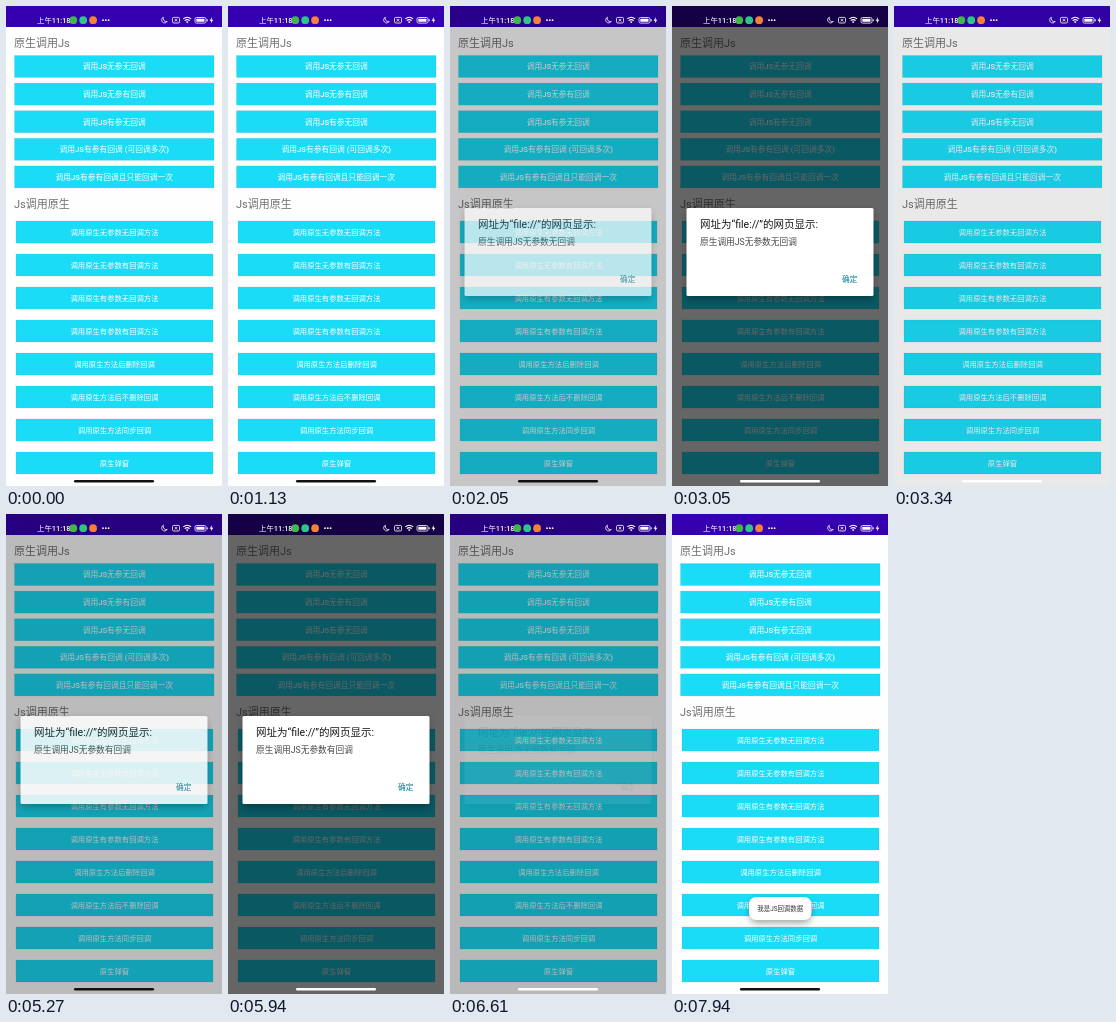
Write an HTML page that moves like this. It is 216 px wide and 480 px high and loops after 7.99 s.

```html
<!DOCTYPE html>
<html lang="zh-CN">
<head>
<meta charset="utf-8">
<title>JS bridge demo</title>
<style>
  html, body { margin: 0; width: 100%; height: 100%; overflow: hidden; background: #fefefe; }
  svg { display: block; width: 100%; height: 100%; }
  text { font-family: Roboto, "Noto Sans CJK SC", "Noto Sans CJK", sans-serif; white-space: pre; }
</style>
</head>
<body>
<svg id="stage" viewBox="0 0 216 480">
  <defs>
    <filter id="soft" x="-30%" y="-60%" width="160%" height="240%"><feGaussianBlur stdDeviation="3.5"/></filter>
  </defs>
  <rect width="216" height="480" fill="#fefefe"/>
  <rect width="216" height="21" fill="#3400b0"/>
  <g id="page"></g>
  <rect id="dim" width="216" height="480" fill="#000" opacity="0"/>
  <g id="dialog" opacity="0">
    <rect x="15" y="205" width="186" height="88" rx="2" fill="#000" opacity=".3" filter="url(#soft)"/>
    <rect x="14.5" y="202" width="187" height="88" rx="1.5" fill="#fff"/>
    <text x="28" y="221.5" font-size="10.5" fill="#161616">网址为“file://”的网页显示:</text>
    <text id="message" x="28" y="239" font-size="8.7" fill="#484848"></text>
    <text x="170" y="276" font-size="7.7" font-weight="500" fill="#087f94">确定</text>
  </g>
  <g id="toast" opacity="0">
    <rect x="78" y="386" width="61" height="23" rx="7" fill="#000" opacity=".35" filter="url(#soft)"/>
    <rect x="77" y="383" width="62.5" height="23" rx="7" fill="#fff"/>
    <text x="108.2" y="397" font-size="6.4" fill="#333" text-anchor="middle">我是JS回调数据</text>
  </g>
  <g id="status" fill="#fff">
    <text x="31" y="17" font-size="7.4" font-weight="500">上午11:18</text>
    <circle cx="67.3" cy="14.2" r="3.9" fill="#43b649"/>
    <circle cx="77.2" cy="14.2" r="3.9" fill="#2fc489"/>
    <circle cx="87.1" cy="14.2" r="3.9" fill="#f5803a"/>
    <circle cx="97" cy="14.2" r=".9"/><circle cx="99.8" cy="14.2" r=".9"/><circle cx="102.6" cy="14.2" r=".9"/>
    <g fill="none" stroke="#fff" stroke-width=".8">
      <path d="M157.4 11.2a3 3 0 1 0 3.8 4.3a3.2 3.2 0 0 1-3.8-4.3z"/>
      <rect x="166.5" y="11.4" width="7" height="5.6" rx="1.2"/>
      <path d="M168.7 12.9l2.6 2.6m0-2.6l-2.6 2.6"/>
      <path d="M177.3 12.9q3.9-3.3 7.8 0M178.7 14.6q2.5-2 5 0" stroke-width="1.1"/>
      <rect x="189" y="11.5" width="11" height="5.6" rx="1.6"/>
    </g>
    <path d="M179.9 15.8q1.3-.9 2.6 0l-1.3 1.5z"/>
    <rect x="190.3" y="12.8" width="8.2" height="3" rx=".6"/>
    <rect x="200.7" y="13.3" width="1" height="2"/>
    <path d="M206 11l-2.4 3.7h1.7l-.5 2.9 2.5-3.9h-1.7z"/>
  </g>
  <rect id="pill" x="68" y="474" width="80" height="2.4" rx="1.2"/>
</svg>
<script>
const LOOP = 7990;
const $ = id => document.getElementById(id);
const NS = 'http://www.w3.org/2000/svg';

function add(tag, attrs, label = '') {
  const el = document.createElementNS(NS, tag);
  for (const key in attrs) el.setAttribute(key, attrs[key]);
  el.textContent = label;
  $('page').append(el);
}

function heading(y, label) {
  add('text', { x: 8, y, 'font-size': 11, fill: '#707070' }, label);
}

function buttons(labels, { x, y, w, step, size, weight }) {
  labels.forEach((label, i) => {
    const top = y + i * step;
    add('rect', { x, y: top, width: w, height: 22, fill: '#1adcf6', stroke: '#5b9ca6', 'stroke-opacity': .3, 'stroke-width': .5 });
    add('text', { x: x + w / 2, y: top + 13.8, 'font-size': size, 'font-weight': weight, fill: '#fff', 'text-anchor': 'middle' }, label);
  });
}

heading(41, '原生调用Js');
buttons(['调用JS无参无回调', '调用JS无参有回调', '调用JS有参无回调', '调用JS有参有回调 (可回调多次)', '调用JS有参有回调且只能回调一次'],
  { x: 8.5, y: 49.5, w: 199.5, step: 27.6, size: 7.75, weight: 500 });
heading(202, 'Js调用原生');
buttons(['无参数无回调方法', '无参数有回调方法', '有参数无回调方法', '有参数有回调方法', '方法后删除回调', '方法后不删除回调', '方法同步回调']
  .map(s => '调用原生' + s).concat('原生弹窗'),
  { x: 10, y: 215, w: 197, step: 33, size: 7.33, weight: 400 });

const alerts = [
  { open: 1960, close: 3220, text: '原生调用JS无参数无回调' },
  { open: 5160, close: 6535, text: '原生调用JS无参数有回调' }
];
const TOAST_AT = 6700;

const ramp = (t, start, length) => Math.min(1, Math.max(0, (t - start) / length));
const show = (id, alpha) => $(id).setAttribute('opacity', alpha.toFixed(3));

function draw(t) {
  const a = alerts[t < 4500 ? 0 : 1];
  $('message').textContent = a.text;
  show('dialog', ramp(t, a.open, 130) * (1 - ramp(t, a.close, 81)));
  show('dim', .6 * ramp(t, a.open, 250) * (1 - ramp(t, a.close, 140)));
  $('pill').setAttribute('fill', t > a.open + 260 && t < a.close + 140 ? '#fff' : '#111');
  show('toast', ramp(t, TOAST_AT, 200));
}

function tick() {
  draw(performance.now() % LOOP);
  requestAnimationFrame(tick);
}
tick();
</script>
</body>
</html>
```
